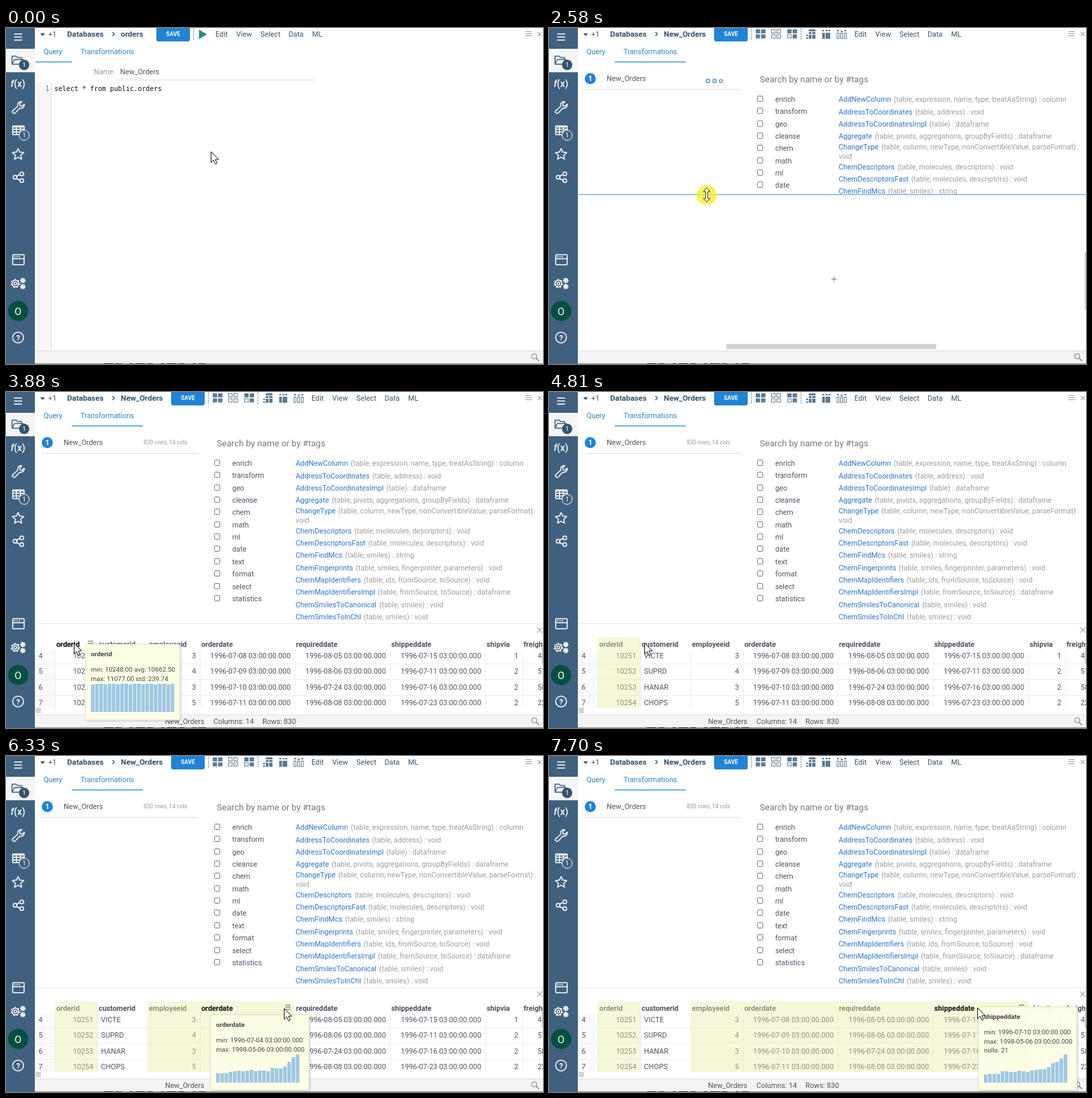
Recreate the animation shown at these times as an HTML page. Size 800x501 px, loop 8 s.

```html
<!DOCTYPE html>
<html lang="en">
<head>
<meta charset="utf-8">
<title>Query transformations</title>
<style>
html, body { margin: 0; width: 100%; height: 100%; overflow: hidden; background: #fff; }
svg { display: block; width: 800px; height: 501px; font: 10.8px Roboto, sans-serif; fill: #4d5261; }
text { white-space: pre; }
.bold { font-weight: 700; }
.title { font-size: 11.5px; font-weight: 700; fill: #34536f; }
.menu { fill: #34536f; }
.link { fill: #2a75cc; }
.tab { fill: #2584c8; }
.muted { fill: #9c9c9c; }
.code { font: 9.85px "DejaVu Sans Mono", monospace; fill: #111; }
.search { font-size: 13.1px; fill: #757575; }
.small { font-size: 8.4px; fill: #999; }
.tip { font-size: 9.75px; fill: #444; }
.white { fill: #fff; }
.mid { text-anchor: middle; }
.end { text-anchor: end; }
.icon { fill: none; stroke: #fff; stroke-width: 1.5; stroke-linejoin: round; }
.tool { fill: #5d7b93; stroke: none; }
</style>
</head>
<body>
<svg id="stage" viewBox="0 0 800 501"></svg>
<script>
const LOOP = 8000;
const text = (x, y, s, cls = '') => `<text x="${x}" y="${y}" class="${cls}">${s}</text>`;
const rect = (x, y, w, h, fill, more = '') =>
  `<rect x="${x}" y="${y}" width="${w}" height="${h}" fill="${fill}" ${more}/>`;
const circle = (x, y, r, more = '') => `<circle cx="${x}" cy="${y}" r="${r}" ${more}/>`;
const path = (d, more = '') => `<path d="${d}" ${more}/>`;
const group = (id, body, more = '') => `<g id="${id}" ${more}>${body}</g>`;
const line = (d, color, more = '') => path(d, `fill="none" stroke="${color}" ${more}`);

function polar(cx, cy, r, angle) {
  return `${(cx + r * Math.cos(angle)).toFixed(1)} ${(cy + r * Math.sin(angle)).toFixed(1)}`;
}
function star(cx, cy) {
  const points = Array.from({ length: 10 }, (_, i) =>
    polar(cx, cy, i % 2 ? 4.2 : 8.8, i * Math.PI / 5 - Math.PI / 2));
  return path(`M${points.join('L')}Z`);
}
function gear(cx, cy, r) {
  return circle(cx, cy, r) + circle(cx, cy, r * 0.4) +
    circle(cx, cy, r + 1, `stroke-dasharray="${r * 0.42} ${r * 0.62}" stroke-width="1.6"`);
}

function sidebar() {
  const icons =
    path('M12 9h12M12 13.5h12M12 18h12') +
    path('M9 54V42h6l2 2h6v3M9 54l3.500-7h13l-3 7z', 'stroke="#3f5f80"') +
    path('M10.500 126.500a2 2 0 0 1 0-3.500l7-6.500c-1-4 2-7.500 6-6.500l-3 3 .5 3 3 .5 3-3c1 4-3 7-6.500 6l-6.500 7a2 2 0 0 1-3.500 0z') +
    rect(10, 146, 17, 13, 'none', 'rx="1"') + path('M10 147.500h17M10 151h17M10 155h17M15.500 146v13M21.500 146v13') +
    star(18, 188.5) +
    path('M21 218l-6 3.500M15 224l6 3.500') + circle(13.5, 222.5, 2.8) + circle(23.5, 217.5, 2.8) + circle(23.5, 227.5, 2.8) +
    rect(10, 338, 17, 15, 'none', 'rx="1"') + path('M10 344h17M12 341h2M15.500 341h2M19 341h2') +
    gear(14, 381, 5) + gear(25, 376.5, 2.4) + gear(25, 385.5, 2.4) +
    circle(18, 461.5, 8);
  return rect(0, 0, 43, 501, '#40607f') + rect(0, 31, 43, 35, '#f5f5f5') +
    `<g class="icon">${icons}</g>` +
    circle(27, 55, 7.7, 'fill="#34536f"') + text(27, 58.3, '1', 'white mid tip') +
    `<text x="7" y="88" class="white" font-size="14" font-weight="500"><tspan font-style="italic">f</tspan>(x)</text>` +
    circle(27, 160, 7.5, 'fill="#40607f" stroke="#fff"') + text(27, 163.3, '1', 'white mid tip') +
    circle(18, 422, 15, 'fill="#00503f"') +
    `<text x="18" y="427.500" class="white mid" font-size="15">O</text>` +
    `<text x="18" y="465.500" class="white mid bold" font-size="11.500">?</text>`;
}

function menu(dx) {
  const items = { Edit: 312, View: 343, Select: 379, Data: 421, ML: 456 };
  return Object.entries(items).map(([name, x]) => text(x + dx, 13, name, 'menu')).join('');
}
const saveButton = x => rect(x, -4, 50, 24, '#2083d5', 'rx="3"') +
  `<text x="${x + 25}" y="12" class="white mid bold" font-size="8.500">SAVE</text>`;
const dashes = x => line(`M${x} 1V18`, '#777', 'stroke-dasharray="2 1.500"');

// Four tiles; each bit of the mask marks a solid one.
function tiles(x, mask) {
  return [0, 1, 2, 3].map(i => {
    const solid = mask >> i & 1;
    return rect(x + (i % 2) * 8 + .5, 2.5 + (i >> 1) * 7.5, 5.5, 5, solid ? '#5d7b93' : '#fff', 'stroke="#5d7b93"');
  }).join('');
}
function toolIcons() {
  const blocks = [
    [387, 2, 10, 3], [387, 6, 4, 3], [392, 6, 5, 3], [387, 10, 4, 6], [392, 10, 5, 6], [383, 10, 3, 2], [383, 14, 3, 2],
    [407, 3, 3, 2], [412, 3, 3, 2], [416, 3, 3, 2], [407, 7, 4, 9], [412, 7, 7, 9]
  ].map(b => rect(...b, '#5d7b93')).join('');
  const columns = [429, 434.5, 440].map((x, i) =>
    rect(x, 7.5, 3, 8, '#fff', 'stroke="#5d7b93"') + rect(x, 3 + i % 2, 3, 2, '#5d7b93')).join('');
  return tiles(308, 15) + tiles(331, 0) + tiles(355, 11) + blocks + columns;
}

function header() {
  return path('M51 8h7l-3.500 4z', 'fill="#34536f"') + text(63, 13, '+1', 'menu') +
    text(91, 13, 'Databases', 'title') + line('M158.500 6l3 3-3 3', '#34536f', 'stroke-width="1.300"') +
    line('M774 5.500h9M774 8.500h9M774 11.500h9', '#999') + line('M792 6l6 6M798 6l-6 6', '#888') +
    text(56, 39, 'Query', 'tab') + text(111, 39, 'Transformations', 'tab');
}

function queryView() {
  return text(171, 13, 'orders', 'title') + saveButton(224) + dashes(279.5) +
    path('M287.500 2.500L299.500 9.500 287.500 16.500z', 'fill="#2d8983"') + menu(0) +
    rect(44, 50, 54, 1.2, '#2083d5') +
    text(131, 69, 'Name', 'muted') + text(170, 69, 'New_Orders') + rect(166, 77, 294, 1, '#ddd') +
    rect(44, 81, 23, 400, '#f7f7f7') + rect(67, 81, 1, 400, '#ddd') +
    `<text x="64.500" y="94" class="code end" style="fill:#4a7fb5">1</text>` +
    text(72, 94, 'select * from public.orders', 'code');
}

const tags = ['enrich', 'transform', 'geo', 'cleanse', 'chem', 'math', 'ml', 'date', 'text', 'format', 'select', 'statistics'];
const functions = [
  [110, 'AddNewColumn', '(table, expression, name, type, treatAsString) : column'],
  [129, 'AddressToCoordinates', '(table, address) : void'],
  [147, 'AddressToCoordinatesImpl', '(table) : dataframe'],
  [165, 'Aggregate', '(table, pivots, aggregations, groupByFields) : dataframe'],
  [181, 'ChangeType', '(table, column, newType, nonConvertibleValue, parseFormat) :'],
  [211, 'ChemDescriptors', '(table, molecules, descriptors) : void'],
  [229, 'ChemDescriptorsFast', '(table, molecules, descriptors) : void'],
  [247, 'ChemFindMcs', '(table, smiles) : string'],
  [266, 'ChemFingerprints', '(table, smiles, fingerprinter, parameters) : void'],
  [284, 'ChemMapIdentifiers', '(table, ids, fromSource, toSource) : void'],
  [302, 'ChemMapIdentifiersImpl', '(table, fromSource, toSource) : dataframe'],
  [321, 'ChemSmilesToCanonical', '(table, smiles) : void'],
  [339, 'ChemSmilesToInChI', '(table, smiles) : void']
];

function transformView() {
  const tagRows = tags.map((tag, i) => {
    const y = 106 + 18.35 * i;
    return rect(310.5, Math.round(y) - 4.5, 8, 8, '#fff', 'stroke="#777" rx="1"') + text(337, y + 4, tag);
  }).join('');
  const functionRows = functions.map(([y, name, args]) =>
    `<text x="431.500" y="${y}" class="link">${name}<tspan dx="4" class="muted">${args}</tspan></text>`).join('');
  return text(171, 13, 'New_Orders', 'title') + saveButton(246) + dashes(301.5) + toolIcons() + dashes(375.5) + menu(143) +
    rect(98, 50, 106, 1.2, '#2083d5') +
    circle(61.5, 75.5, 8.3, 'fill="#2083d5"') + text(61.5, 79.2, '1', 'white mid bold') +
    text(86, 79, 'New_Orders') + rect(53, 91, 233, 1, '#ddd') +
    group('loader', [0, 1, 2, 3].map(() => circle(0, 79, 2.6)).join(''), 'fill="#fff" stroke="#3b82c4" stroke-width="1.200"') +
    group('summary', text(205, 78.3, '830 rows, 14 cols', 'small')) +
    text(314, 81, 'Search by name or by #tags', 'search') +
    tagRows + functionRows + text(431.5, 194.5, 'void', 'muted') +
    group('pane', rect(44, 0, 756, 260, '#fff')) + rect(44, 0, 756, 1, '#e8e8e8', 'id="splitter"') +
    group('empty', line('M420.500 0h8M424.500-4v8', '#6d8296', 'id="plus"') +
      rect(798, 0, 2, 0, '#ccc', 'id="vbar"') + rect(264, 471, 313, 8, '#d2d2d2')) +
    group('grid', grid());
}

const columns = [
  { name: 'orderid', left: 73, right: 136, cells: [10251, 10252, 10253, 10254] },
  { name: 'customerid', left: 136, right: 211, start: true, cells: ['VICTE', 'SUPRD', 'HANAR', 'CHOPS'] },
  { name: 'employeeid', left: 211, right: 289, cells: [3, 4, 3, 5] },
  { name: 'orderdate', left: 289, right: 430, date: true, cells: ['07-08', '07-09', '07-10', '07-11'] },
  { name: 'requireddate', left: 430, right: 572, date: true, cells: ['08-05', '08-06', '07-24', '08-08'] },
  { name: 'shippeddate', left: 572, right: 714, date: true, cells: ['07-15', '07-11', '07-16', '07-23'] },
  { name: 'shipvia', left: 714, right: 769, cells: [1, 2, 2, 2] },
  { name: 'freight', left: 769, right: 840, start: true, inset: 23, cells: ['41.34', '51.30', '58.17', '22.98'] }
];
const rowY = i => 397 + 23.4 * i;

function grid() {
  const rows = [0, 1, 2, 3].map(i =>
    rect(44, Math.round(rowY(i) + 8), 756, 1, '#eee') + text(48.5, rowY(i), i + 4)).join('');
  const body = columns.map(c => rect(c.right, 385, 1, 86, '#eee') +
    text(c.left + 2, 380, c.name, 'bold') +
    c.cells.map((v, i) => text(c.start ? c.left + (c.inset || 5.5) : c.right - 6, rowY(i),
      c.date ? `1996-${v} 03:00:00.000` : v, c.start ? '' : 'end')).join('')).join('');
  const marks = columns.map((c, i) =>
    rect(c.left, 366, c.right - c.left, 105, '#e9e9a4', `opacity=".42" id="mark${i}"`)).join('');
  return rect(44, 385, 29, 86, '#fafafa') + rect(73, 385, 1, 86, '#eee') + rows + body + marks +
    rect(44, 471, 756, 10, '#fff') + rect(44, 471, 8, 8, '#d2d2d2') + rect(798, 381, 2, 24, '#d2d2d2') +
    line('M791 351l8 8M799 351l-8 8', '#888');
}

const dateRange = (min, max) => [`min: ${min} 03:00:00.000`, `max: ${max} 03:00:00.000`];
const tips = [
  { from: 3700, to: 4760, col: 0, x: 118, y: 376, w: 141, h: 113, base: 101,
    lines: ['min: 10248.00 avg: 10662.50', 'max: 11077.00 std: 239.74'],
    bars: Array.from({ length: 20 }, (_, i) => i % 3 ? 42 : 41) },
  { from: 4980, to: 5800, col: 2, x: 223.5, y: 383, w: 141, h: 111, base: 99,
    lines: ['min: 1.00 avg: 4.40', 'max: 9.00 std: 2.50'],
    bars: [33, 0, 25, 0, 0, 33, 0, 41, 0, 0, 11, 0, 18, 0, 0, 19, 0, 27, 0, 11] },
  { from: 5800, to: 6560, col: 3, x: 304.5, y: 386, w: 147, h: 112, base: 101,
    lines: dateRange('1996-07-04', '1998-05-06'),
    bars: [14, 14, 14, 16, 17, 18, 17, 18, 19, 17, 18, 18, 17, 22, 21, 21, 24, 31, 38, 42] },
  { from: 6560, to: 7230, col: 4, x: 499, y: 386, w: 147, h: 112, base: 101,
    lines: dateRange('1996-07-18', '1998-06-03'),
    bars: [13, 14, 14, 15, 16, 18, 17, 17, 18, 17, 18, 18, 19, 21, 21, 22, 26, 31, 37, 42] },
  { from: 7230, to: LOOP, col: 5, x: 639.5, y: 374, w: 147, h: 124, base: 113,
    lines: [...dateRange('1996-07-10', '1998-05-06'), 'nulls: 21'],
    bars: [12, 13, 13, 13, 17, 17, 16, 16, 18, 17, 16, 18, 19, 20, 20, 23, 29, 31, 36, 42] }
];

function tooltip(tip, i) {
  const { name, left, right } = columns[tip.col];
  const box = rect(0, 0, tip.w, tip.h, '#fdfee6', 'rx="2" opacity=".97" stroke="#e2e2c4" filter="url(#shadow)"') +
    text(8.5, 18, name, 'tip bold') +
    tip.lines.map((s, n) => text(8.5, 41 + 13.5 * n, s, 'tip')).join('') +
    tip.bars.map((h, n) => rect(8.5 + 6.25 * n, tip.base - h, 5.3, h, '#9fc7e4')).join('');
  return group(`tip${i}`,
    `<text x="${left + 2}" y="380" class="bold" style="fill:#222">${name}</text>` +
    line(`M${right - 14} 371.500h8M${right - 14} 374.500h8M${right - 14} 377.500h8`, '#666') +
    `<g transform="translate(${tip.x} ${tip.y})">${box}</g>`);
}

function statusBar() {
  return rect(44, 481, 756, 20, '#f4f4f4') + rect(44, 481, 756, 1, '#ddd') +
    rect(0, 500, 800, 1, '#8b8b8b') + line('M146 500.500H298', '#222', 'stroke-dasharray="14 3 9 12 5 4"') +
    group('status', text(237, 495, 'New_Orders') + text(309, 495, 'Columns: 14') + text(382, 495, 'Rows: 830')) +
    circle(787, 489.5, 3.9, 'fill="none" stroke="#777"') + line('M790 492.500l4 4', '#777', 'stroke-width="1.300"');
}

const pointer =
  group('arrow', path('M.5.5v16l3.700-3.500 2.600 5.800 2.600-1.100-2.600-5.700h5z'), 'fill="#fff" stroke="#111"') +
  group('resize', path('M0-10.500l5 5.500h-3.500v10h3.500l-5 5.500-5-5.500h3.500v-10h-3.500z'), 'fill="#fff" stroke="#333"');

document.getElementById('stage').innerHTML =
  '<defs><filter id="shadow"><feDropShadow dx="1" dy="1" stdDeviation="1.500" flood-opacity=".22"/></filter></defs>' +
  rect(0, 0, 800, 501, '#fff') + group('query', queryView()) + group('transform', transformView()) +
  header() + statusBar() + sidebar() + tips.map(tooltip).join('') +
  group('pointer', circle(0, 0, 14.7, 'id="press" fill="#f8ec1c" opacity=".75"') + pointer);

const el = id => document.getElementById(id);
const show = (id, on) => { el(id).style.display = on ? '' : 'none'; };
const within = (t, from, to) => t >= from && t < to;

const SWITCH = 830, LOADED = 3290;
const dragStart = 2640, dragEnd = 3160;
const route = [
  [70, 305, 184], [550, 165, 36], [880, 165, 36], [1450, 201, 161], [1580, 201, 161],
  [2380, 235, 249], [dragStart, 235, 249], [dragEnd, 160, 346], [LOADED, 160, 346],
  [3880, 101, 374], [4600, 101, 374], [5160, 233, 375], [5680, 233, 375], [5990, 414, 376],
  [6340, 414, 376], [6800, 497, 376], [7050, 497, 376], [7380, 638, 375]
];
const presses = [[690, 820], [2450, 3190], [4540, 4610], [5620, 5680], [6190, 6260], [6860, 6930], [7640, 7700]];
const marked = { 0: 4540, 2: 5620, 3: 6190, 4: 6860, 5: 7640 };

const ease = p => (1 - Math.cos(Math.PI * Math.min(1, Math.max(0, p)))) / 2;

function position(t) {
  const next = route.findIndex(k => k[0] > t);
  if (next === 0) return route[0].slice(1);
  if (next < 0) return route.at(-1).slice(1);
  const [t0, x0, y0] = route[next - 1], [t1, x1, y1] = route[next];
  const p = ease((t - t0) / (t1 - t0));
  return [x0 + (x1 - x0) * p, y0 + (y1 - y0) * p];
}

// Dots step right; one grows in at the left while one shrinks away at the right.
function drawLoader(t) {
  const clock = within(t, 1450, 1580) ? 1450 : t;
  const phase = ((clock - 2580) / 600 % 1 + 1) % 1;
  const s = 0.5 - Math.sin(Math.asin(1 - 2 * phase) / 3);
  const p = 3 * s * (1 - s) ** 2 + s ** 3;
  const dots = [[236, p], [236 + 10 * p, 1], [246 + 10 * p, 1], [256, Math.max(0, 1 - 2 * p)]];
  [...el('loader').children].forEach((dot, i) => {
    dot.setAttribute('cx', dots[i][0]);
    dot.setAttribute('r', 2.6 * dots[i][1]);
  });
}

function draw(t) {
  const loaded = t >= LOADED, resizing = within(t, 2300, 3270);
  show('query', t < SWITCH);
  show('transform', t >= SWITCH);
  show('loader', !loaded);
  show('empty', !loaded);
  for (const id of ['summary', 'grid', 'status']) show(id, loaded);
  drawLoader(t);

  const split = Math.round(248 + 97 * ease((t - dragStart) / (dragEnd - dragStart)));
  const barHeight = 86 * (475 - split) / 227;
  el('pane').setAttribute('transform', `translate(0 ${split})`);
  el('splitter').setAttribute('y', split);
  el('splitter').setAttribute('fill', resizing ? '#4b9fc9' : '#e8e8e8');
  el('plus').setAttribute('transform', `translate(0 ${Math.round((split + 500) / 2) + .5})`);
  el('vbar').setAttribute('y', (split + 506 - barHeight) / 2);
  el('vbar').setAttribute('height', barHeight);

  columns.forEach((_, i) => show(`mark${i}`, t >= (marked[i] ?? LOOP)));
  tips.forEach((tip, i) => show(`tip${i}`, within(t, tip.from, tip.to)));

  const [x, y] = position(t).map(Math.round);
  el('pointer').setAttribute('transform', `translate(${x} ${y})`);
  show('press', presses.some(([from, to]) => within(t, from, to)));
  show('arrow', !resizing);
  show('resize', resizing);
}

function tick() {
  draw(performance.now() % LOOP);
  requestAnimationFrame(tick);
}
tick();
</script>
</body>
</html>
```
